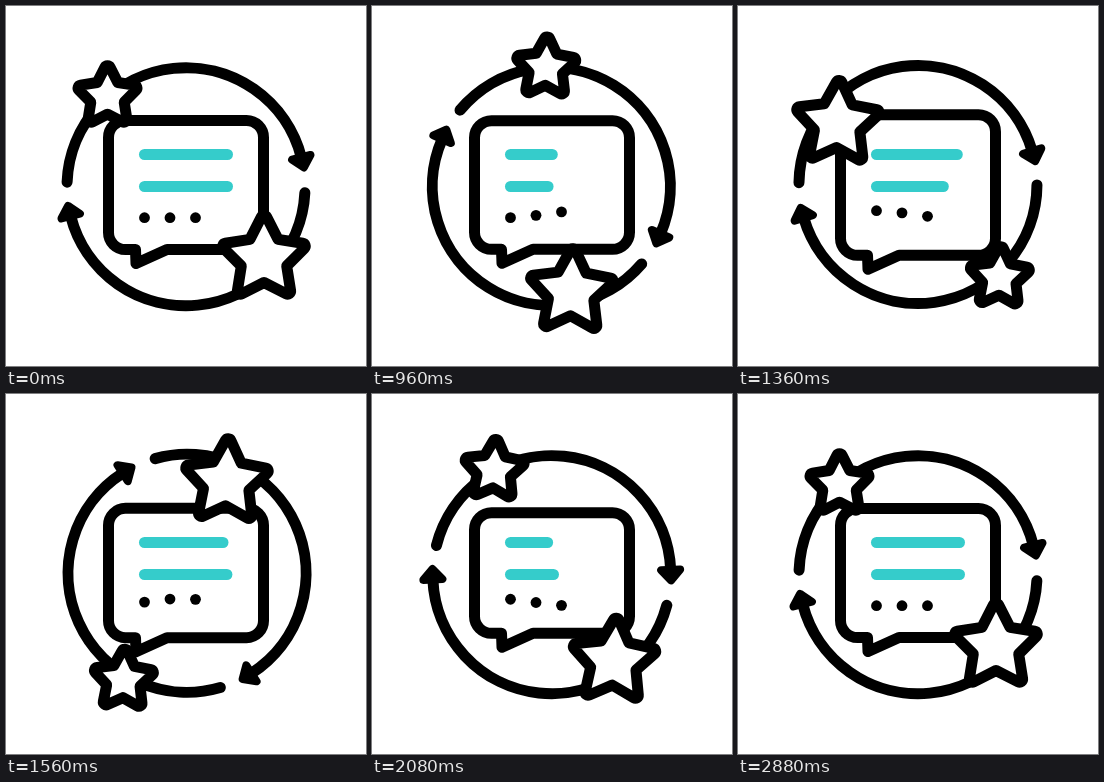
Animation of 360x360 px, one loop 3000 ms. Source, as an HTML page:

```html
<!DOCTYPE html>
<html lang="en">
<head>
<meta charset="utf-8">
<title>Feedback loop</title>
<style>
  html, body { margin: 0; width: 100%; height: 100%; overflow: hidden; background: #fff; }
  svg { display: block; width: 100vw; height: 100vh; }
  .ink { fill: #fff; stroke: #000; stroke-width: 11; stroke-linecap: round; stroke-linejoin: round; }
  .arc { fill: none; }
  .head { fill: #000; stroke: #000; stroke-width: 8; stroke-linejoin: round; }
  .line { stroke: #35cccb; stroke-width: 11; stroke-linecap: round; }
</style>
</head>
<body>
<svg viewBox="0 0 360 360">
  <g id="ring"></g>
  <path id="bubble" class="ink"/>
  <g id="text"></g>
  <g id="stars"></g>
</svg>
<script>
const LOOP = 3000, STEP = 40;
// The ring sits slightly below the point everything turns around.
const CX = 180, CY = 179.6, R = 119, DROP = 1.1;
const RAD = Math.PI / 180;

// Each track is a list of [time, value] pairs.
const spin = track([[200, 0], [480, -11], [640, -9.2], [960, 37.7], [1360, 178],
  [1800, 323.7], [2200, 379], [2440, 375.1], [2880, 360]]);
const tilt = track([[200, 0], [640, 2], [1800, 2.5], [2440, 5], [2880, 0]]);
const stretch = track([[200, 0], [620, -6.5], [1300, 6.2], [1840, -6.5], [2440, 0], [2880, 0]]);

const FULL = 221.5, SHORT = 175.5;
const lines = [
  { y: 148.5, times: [220, 840, 1440, 2060, 2700] },
  { y: 180.5, times: [390, 1000, 1600, 2220, 2860] }
];
const dots = [{ x: 138.5, start: 200 }, { x: 164, start: 335 }, { x: 189.5, start: 465 }];
const HOP = 780, HOPS = 3;
const stars = [{ x: 101.5, y: 87.7, r: 34.4 }, { x: 258, y: 248.5, r: 46.8 }];
const NOTCH = 0.51, TIP = 3;

const $ = id => document.getElementById(id);

function add(parent, tag, attrs) {
  const el = document.createElementNS('http://www.w3.org/2000/svg', tag);
  return parent.appendChild(set(el, attrs));
}

function set(el, attrs) {
  for (const k in attrs) el.setAttribute(k, attrs[k]);
  return el;
}

// Smooth monotone interpolation: flat at every turning point.
function track(keys) {
  const n = keys.length;
  const slope = i => (keys[i + 1][1] - keys[i][1]) / (keys[i + 1][0] - keys[i][0]);
  const tan = keys.map((_, i) => {
    if (i === 0 || i === n - 1) return 0;
    const a = slope(i - 1), b = slope(i);
    return a * b > 0 ? 2 * a * b / (a + b) : 0;
  });
  return t => {
    if (t <= keys[0][0]) return keys[0][1];
    if (t >= keys[n - 1][0]) return keys[n - 1][1];
    let i = 0;
    while (t >= keys[i + 1][0]) i++;
    const [t0, a] = keys[i], [t1, b] = keys[i + 1];
    const d = t1 - t0, u = (t - t0) / d, s = u * u * (3 - 2 * u);
    return a + (b - a) * s + d * u * (1 - u) * (tan[i] * (1 - u) - tan[i + 1] * u);
  };
}

const polar = (r, deg) => [r * Math.cos(deg * RAD), r * Math.sin(deg * RAD)];
const mix = (a, b, k) => [a[0] + (b[0] - a[0]) * k, a[1] + (b[1] - a[1]) * k];

// Five-pointed star with round tips, centred on its bounding box.
function starPath(r) {
  const [sx, sy] = polar(r * NOTCH, 36);
  const run = r - sx, half = Math.atan2(sy, run);
  const cut = TIP / Math.tan(half) / Math.hypot(run, sy);
  const reach = r - TIP * (1 / Math.sin(half) - 1);
  const shift = p => [p[0], p[1] + reach * (1 - Math.cos(36 * RAD)) / 2];
  let d = '';
  for (let i = 0; i < 5; i++) {
    const a = -90 + 72 * i;
    const [tip, before, after] =
      [polar(r, a), polar(r * NOTCH, a - 36), polar(r * NOTCH, a + 36)].map(shift);
    d += `${i ? 'L' : 'M'}${before}L${mix(tip, before, cut)}A${TIP} ${TIP} 0 0 1 ${mix(tip, after, cut)}`;
  }
  return d + 'Z';
}

function bubblePath(e) {
  const top = 114.5 - e, bot = 243.5 + e;
  return `M119.5 ${top}H240.5a17 17 0 0 1 17 17V${bot - 17}a17 17 0 0 1 -17 17` +
    `H161L130 ${bot + 14}L129.5 ${bot}H119.5a17 17 0 0 1 -17 -17V${top + 17}a17 17 0 0 1 17 -17Z`;
}

function hop(t) {
  return t > 0 && t < HOP * HOPS ? 3.5 * (1 - Math.cos(2 * Math.PI * t / HOP)) : 0;
}

for (const [from, to] of [[182.2, 345.7], [2.9, 165.7]]) {
  add($('ring'), 'path', { class: 'ink arc', d: `M${polar(R, from)}A${R} ${R} 0 0 1 ${polar(R, to)}` });
  add($('ring'), 'path', { class: 'head', d: 'M-9.5 0H9.5L0 10.5Z',
    transform: `rotate(${to}) translate(${R} 0)` });
}
for (const l of lines) {
  l.end = track(l.times.map((t, i) => [t, i % 2 ? SHORT : FULL]));
  l.el = add($('text'), 'line', { class: 'line', x1: 138.5, y1: l.y, y2: l.y });
}
for (const d of dots) d.el = add($('text'), 'circle', { cx: d.x, r: 5.4 });
for (const s of stars) s.el = add($('stars'), 'path', { class: 'ink', d: starPath(s.r) });

function draw(t) {
  const a = spin(t), c = Math.cos(a * RAD), s = Math.sin(a * RAD);
  set($('ring'), { transform: `translate(${CX} ${CY}) rotate(${a}) translate(0 ${DROP})` });
  set($('bubble'), { d: bubblePath(stretch(t)) });
  for (const l of lines) set(l.el, { x2: l.end(t) });
  for (const d of dots) set(d.el, { cy: 211.7 - hop(t - d.start) });
  for (const p of stars) {
    const dx = p.x - CX, dy = p.y - CY;
    set(p.el, { transform:
      `translate(${CX + dx * c - dy * s} ${CY + dx * s + dy * c}) rotate(${tilt(t)})` });
  }
}

const begin = performance.now();
function tick() {
  const t = (performance.now() - begin) % LOOP;
  draw(Math.floor(t / STEP) * STEP);
  requestAnimationFrame(tick);
}
tick();
</script>
</body>
</html>
```
